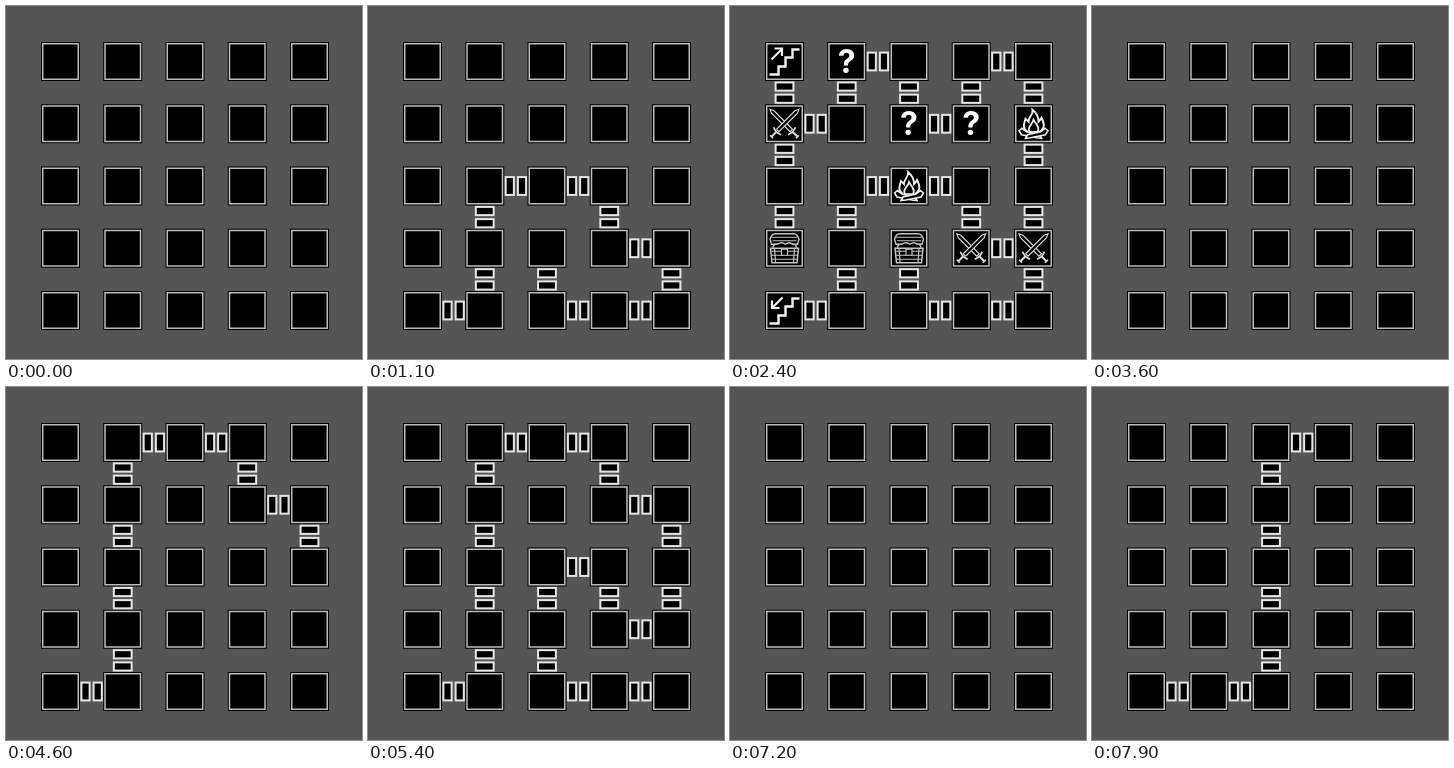
Write an HTML page with a canvas that moves like this. It is 356 px wide and 353 px high and loops after 8 s.

```html
<!DOCTYPE html>
<html lang="en">
<head>
<meta charset="utf-8">
<title>Dungeon map generator</title>
<style>
html, body { margin: 0; height: 100%; overflow: hidden; background: #555; }
canvas { display: block; }
</style>
</head>
<body>
<canvas id="stage" width="356" height="353"></canvas>
<script>
const ctx = document.getElementById('stage').getContext('2d');
const LOOP = 8000, STEP = 100, CYCLE = 3600;
const SIZE = 5, PITCH = 62.25, LEFT = 54.5, TOP = 55.5, EDGES = 24;
const DIRS = { U: [0, -1], D: [0, 1], L: [-1, 0], R: [1, 0] };

// Each walk is a start cell (column, row) followed by its moves.
const MAZES = [
  {
    walks: '04RUURRDRDLLU 43UUULDLULDL 01DD 01U',
    icons: { up: '00', mystery: '10 21 31', swords: '01 33 43', fire: '41 22', chest: '03 23', down: '04' }
  },
  {
    walks: '04RUUUURRDRDDLULDDRR 22U 41U 10LDDD',
    icons: { up: '40', mystery: '01 03 13', swords: '10 41 22', fire: '33 34', chest: '21 44', down: '04' }
  },
  { walks: '04RRUUUUR', icons: {} }
];

function parseWalks(text) {
  return text.split(' ').flatMap(walk => {
    let x = +walk[0], y = +walk[1];
    return [...walk.slice(2)].map(move => {
      const [dx, dy] = DIRS[move];
      const edge = { x: x + dx / 2, y: y + dy / 2, vertical: dy !== 0 };
      x += dx;
      y += dy;
      return edge;
    });
  });
}
for (const maze of MAZES) maze.edges = parseWalks(maze.walks);

function at(col, row, draw) {
  ctx.save();
  ctx.translate(LEFT + col * PITCH, TOP + row * PITCH);
  draw();
  ctx.restore();
}

function line(points, width) {
  ctx.beginPath();
  for (let i = 0; i < points.length; i += 2) ctx.lineTo(points[i], points[i + 1]);
  ctx.lineWidth = width;
  ctx.stroke();
}

function shape(path, width) {
  const p = new Path2D(path);
  ctx.fillStyle = '#000';
  ctx.fill(p);
  ctx.lineWidth = width;
  ctx.stroke(p);
}

function mirrored(draw) {
  for (const side of [1, -1]) {
    ctx.save();
    ctx.scale(side, 1);
    draw();
    ctx.restore();
  }
}

function cell() {
  ctx.fillStyle = '#000';
  ctx.fillRect(-19.5, -19.5, 39, 39);
  ctx.strokeStyle = '#bcbcbc';
  ctx.lineWidth = 1.5;
  ctx.strokeRect(-17.75, -17.75, 35.5, 35.5);
}

function connector(vertical) {
  if (vertical) ctx.rotate(Math.PI / 2);
  ctx.fillStyle = '#000';
  ctx.strokeStyle = '#e6e6e6';
  ctx.lineWidth = 2;
  for (const x of [-10.2, 2]) {
    ctx.fillRect(x, -8.9, 8.2, 17.8);
    ctx.strokeRect(x, -8.9, 8.2, 17.8);
  }
}

function stairs() {
  line([-15, 13, -6, 13, -6, 5, 1, 5, 1, -4, 8, -4, 8, -12, 15, -12], 2.4);
}

const ICONS = {
  up() {
    stairs();
    line([-13, -2, -3, -12], 2.2);
    line([-10, -13, -2.5, -13, -2.5, -5.5], 2.2);
  },
  down() {
    stairs();
    line([-2, -13, -12, -3], 2.2);
    line([-12.5, -10, -12.5, -2.5, -5, -2.5], 2.2);
  },
  mystery() {
    ctx.fillStyle = '#fff';
    ctx.font = '700 32px Inter, sans-serif';
    ctx.textAlign = 'center';
    ctx.fillText('?', 0, 11.5);
  },
  swords() {
    ctx.strokeStyle = '#dcdcdc';
    mirrored(() => {
      shape('M-14.5-14.5L-10.5-13L8 5.5L5.5 8L-13-10.5Z', 1.1);
      line([11, 3.5, 9, 7, 7, 9, 3.5, 11], 1.6);
      line([8, 8, 13, 13], 2);
      line([11.5, 14.5, 14.5, 11.5], 1.6);
    });
  },
  fire() {
    shape('M-6 8C-12 4-9-1-8-5Q-6-3-5-2C-5-7 0-9-1-14C4-10 5-6 5-2Q7-4 8-6C11 0 12 4 6 8', 1.9);
    shape('M-4 8C-7 3-1 1 0-4C2 0 7 4 4 8Z', 1.7);
    mirrored(() => shape('M-14.5 7L-11.5 4.5L-7 8L6 11L8 14.5L3 14L-12 11Z', 1.6));
  },
  chest() {
    ctx.strokeStyle = '#c4c4c4';
    shape('M-13-4L-14.5-9Q-13-14.5-9-14.5H9Q13-14.5 14.5-9L13-4Z', 1.4);
    line([-13, -11, 13, -11], 1);
    line([-12, -7.5, 12, -7.5], 1);
    shape('M-12 1Q-11-5-7-4Q-3-7 1-4Q5-7 8-4Q12-5 12 1Z', 1.3);
    shape('M-14 0H14L12.5 14.5H-12.5Z', 1.5);
    for (const y of [3, 7, 11]) line([-13, y, 13, y], 1);
    mirrored(() => line([-10, 0, -9, 14], 1.2));
    shape('M-3 1H3V7H-3Z', 1.2);
  }
};

function render(time) {
  const cycle = Math.floor(time / CYCLE);
  const maze = MAZES[cycle];
  const step = Math.min(EDGES, Math.floor((time - cycle * CYCLE) / STEP));

  ctx.fillStyle = '#555';
  ctx.fillRect(0, 0, 356, 353);
  for (let row = 0; row < SIZE; row++) {
    for (let col = 0; col < SIZE; col++) at(col, row, cell);
  }
  for (const edge of maze.edges.slice(0, step)) {
    at(edge.x, edge.y, () => connector(edge.vertical));
  }
  if (step < EDGES) return;

  ctx.strokeStyle = '#f2f2f2';
  for (const [name, cells] of Object.entries(maze.icons)) {
    for (const [col, row] of cells.split(' ')) at(+col, +row, ICONS[name]);
  }
}

function tick() {
  render(performance.now() % LOOP);
  requestAnimationFrame(tick);
}
tick();
</script>
</body>
</html>
```
